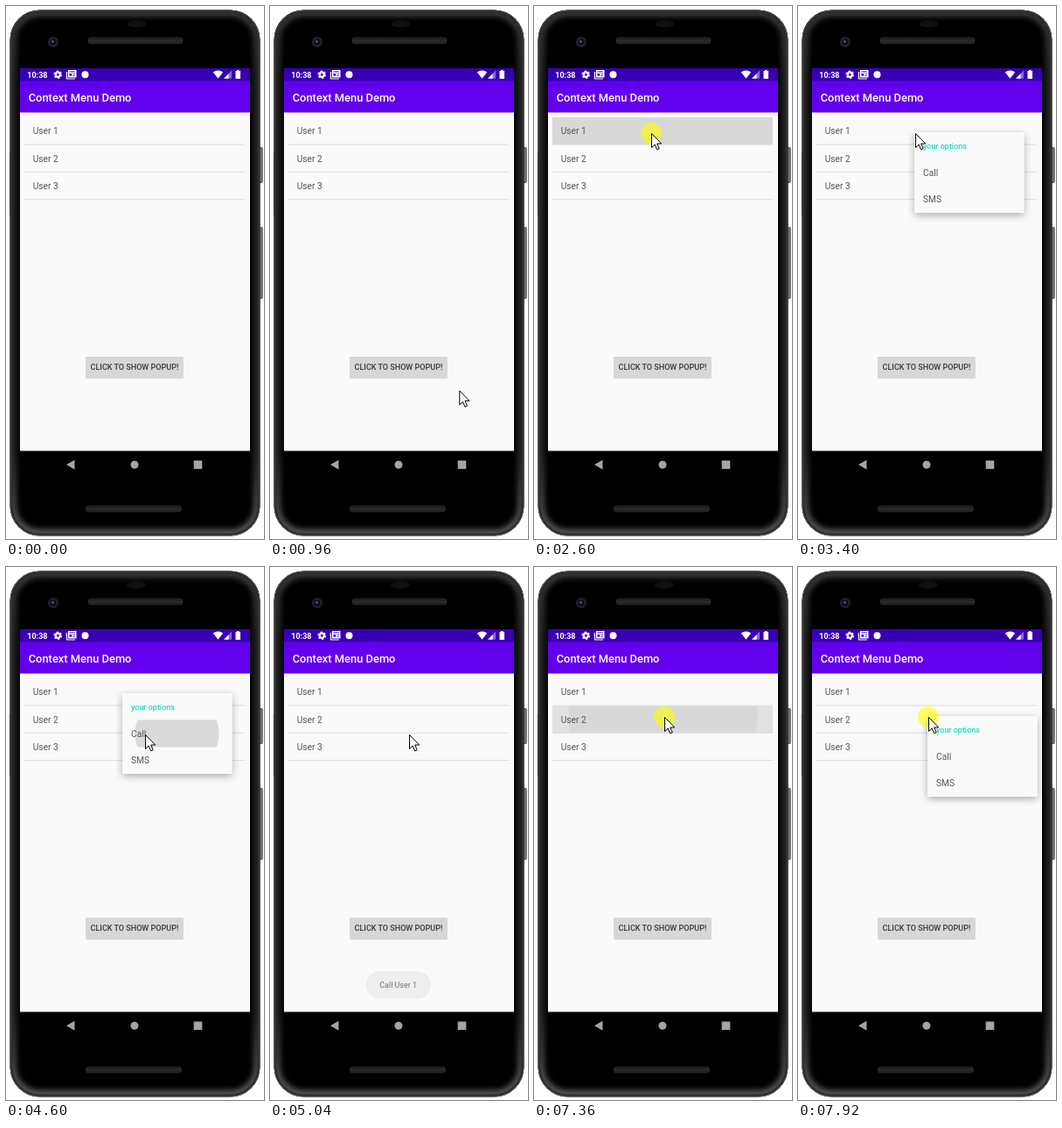
Recreate the animation shown at these times as an HTML page. Size 295 px wide and 608 px high, loop 8 s.

```html
<!DOCTYPE html>
<html lang="en">
<head>
<meta charset="utf-8">
<title>Context Menu Demo</title>
<style>
  html, body { margin: 0; width: 100%; height: 100%; overflow: hidden; background: #fff; }
  svg { display: block; width: 100%; height: 100%; }
  text { font-family: Roboto, sans-serif; font-size: 10.2px; fill: #545454; }
  .medium { font-size: 8.96px; font-weight: 500; }
</style>
</head>
<body>
<svg viewBox="0 0 295 608">
  <defs>
    <linearGradient id="glow" x2="0" y2="1">
      <stop offset="0" stop-color="#3c3c3c"/>
      <stop offset=".12" stop-color="#262626"/>
      <stop offset=".85" stop-color="#262626"/>
      <stop offset="1" stop-color="#5c5c5c"/>
    </linearGradient>
    <linearGradient id="bar" x2="0" y2="1">
      <stop offset="0" stop-color="#141414"/>
      <stop offset=".5" stop-color="#2c2c2c"/>
      <stop offset="1" stop-color="#1a1a1a"/>
    </linearGradient>
    <filter id="soft"><feGaussianBlur stdDeviation="3"/></filter>
    <filter id="shadow" x="-20%" y="-20%" width="140%" height="145%">
      <feDropShadow dx="0" dy="2.5" stdDeviation="4" flood-opacity=".32"/>
    </filter>
    <clipPath id="bodyClip"><rect x="4.500" y="4.500" width="286" height="600" rx="34"/></clipPath>
    <clipPath id="rowClip"><rect id="rowBox" x="21" width="252" height="31"/></clipPath>
    <clipPath id="callClip"><rect y="30.5" width="125" height="31"/></clipPath>
  </defs>

  <!-- phone -->
  <g fill="#7a7a7a" stroke="#383838" stroke-width=".8">
    <rect x="289" y="161.500" width="4.200" height="40" rx="1"/>
    <rect x="289" y="252.500" width="4.200" height="81" rx="1"/>
  </g>
  <path d="M4.500 167v72" stroke="#777" stroke-width="1"/>
  <g clip-path="url(#bodyClip)" fill="none">
    <rect x="4" y="4" width="287" height="601" fill="#000"/>
    <rect x="7.500" y="7.500" width="280" height="594" rx="31" stroke="url(#glow)" stroke-width="9" filter="url(#soft)"/>
    <rect x="5" y="5" width="285" height="599" rx="33.500" stroke="#5e5e5e"/>
    <rect x="6.500" y="6.500" width="282" height="596" rx="32" stroke="#2c2c2c" stroke-width="2"/>
  </g>
  <ellipse cx="149" cy="20.500" rx="11" ry="4" fill="#101014"/>
  <rect x="94" y="36" width="108" height="7" rx="3" fill="url(#bar)" stroke="#333" stroke-width=".6"/>
  <rect x="91.500" y="570" width="109" height="7" rx="3" fill="url(#bar)" stroke="#333" stroke-width=".6"/>
  <circle cx="54" cy="41" r="6" fill="#20222a"/>
  <circle cx="54" cy="41" r="3.600" fill="#0b0c18"/>
  <circle cx="53.500" cy="40.500" r="1.500" fill="#4b5488"/>

  <!-- screen -->
  <rect x="16" y="71" width="263" height="436.500" fill="#fafafa"/>
  <rect x="16" y="71" width="263" height="15" fill="#3700b3"/>
  <rect x="16" y="85.500" width="263" height="36" fill="#6200ee"/>
  <g fill="#fff">
    <text x="24.300" y="82" style="font-size:9px;font-weight:700;fill:#fff">10:38</text>
    <circle cx="59.300" cy="78.300" r="2.600" fill="none" stroke="#fff" stroke-width="2.200"/>
    <circle cx="59.300" cy="78.300" r="4.100" fill="none" stroke="#fff" stroke-width="1.400" stroke-dasharray="2.147"/>
    <path d="M69.500 75v8h9.500" fill="none" stroke="#fff" stroke-width="1.200"/>
    <path d="M71 73h9.500v8.500H71zM72.500 74.500v.9h6.500v-.9zm0 2.500v2.700h2.700V77zm4 0v.8H79V77zm0 1.900v.8H79v-.8z" fill-rule="evenodd"/>
    <circle cx="90.500" cy="78.300" r="4"/>
    <path d="M236.800 75.500Q242.500 71.300 248.200 75.500L242.500 82.800z"/>
    <path d="M258 73.500v9.300h-8.800z" opacity=".4"/>
    <path d="M254.600 77.200v5.600h-5.400z"/>
    <path d="M264 73h2.500v1h1.500v9h-5.500v-9H264z"/>
  </g>
  <text x="25.700" y="108.800" style="font-size:12.9px;font-weight:500;fill:#fff">Context Menu Demo</text>

  <g id="rowRipple" clip-path="url(#rowClip)" fill="#d8d8d8">
    <rect id="rowTint" x="21" y="120" width="252" height="110"/>
    <circle id="rowWave"/>
  </g>
  <g id="list"></g>

  <rect x="91" y="400.800" width="112" height="24.400" rx="1.500" fill="#000" opacity=".12"/>
  <rect x="91" y="400" width="112" height="24.500" rx="1.500" fill="#d6d7d7"/>
  <text class="medium" x="96.600" y="415.300" style="font-size:9.020px;fill:#383838">CLICK TO SHOW POPUP!</text>

  <g id="toast">
    <rect x="110" y="461" width="74" height="31.500" rx="15.700" fill="#eee"/>
    <text x="125.300" y="480" style="font-size:8.96px;fill:#747474">Call User 1</text>
  </g>

  <g fill="#a4a4a4">
    <path d="M78.500 517.800v11L69 523.300z"/>
    <circle cx="147" cy="523.300" r="4.500"/>
    <rect x="214.700" y="518.500" width="9.600" height="9.600"/>
  </g>

  <g id="popup">
    <rect width="125.500" height="92" rx="1" fill="#fafafa" filter="url(#shadow)"/>
    <circle id="callWave" cx="62.500" cy="46" fill="#dadada" clip-path="url(#callClip)"/>
    <text class="medium" x="10" y="18.500" style="fill:#1fd9c4">your options</text>
    <text x="10" y="49.800">Call</text>
    <text x="10" y="80.300">SMS</text>
  </g>

  <circle id="press" r="12" fill="#ff0"/>
  <path id="cursor" d="M.5.500V16.500L4.200 13 6.700 18.800 9.200 17.700 6.700 12H11.700z" fill="#fff" stroke="#000" stroke-width="1"/>
</svg>

<script>
const LOOP = 8000, TICK = 40;
const el = Object.fromEntries([...document.querySelectorAll('svg [id]')].map(e => [e.id, e]));
const set = (node, attrs) => { for (const k in attrs) node.setAttribute(k, attrs[k]); };
const show = (node, alpha) => set(node, { opacity: alpha, visibility: alpha > 0 ? 'visible' : 'hidden' });

el.list.innerHTML = [0, 1, 2].map(i => `
  <text x="30.700" y="${146 + i * 31.5}">User ${i + 1}</text>
  <rect x="21" y="${157.5 + i * 31.3}" width="252" height="1" fill="#dedede"/>`).join('');

const linear = u => u;
const easeOut = u => 1 - (1 - u) ** 2;
const easeInOut = u => u * u * (3 - 2 * u);

// Number of steps already taken out of n spread over from..to.
function stepsDone(t, from, to, n) {
  let done = 0;
  while (done < n && t >= Math.round((from + (to - from) * done / (n - 1 || 1)) / TICK) * TICK) done++;
  return done;
}

// Value of the last [time, value] pair that has been reached.
const at = (t, keys, start = 0) => keys.reduce((v, [time, next]) => t >= time ? next : v, start);

const moves = [
  { from: 560, to: 1320, n: 8, a: [251, 555], b: [170, 283], ease: linear },
  { from: 1440, to: 1640, n: 3, a: [170, 283], b: [145, 174], ease: linear },
  { from: 1720, to: 1960, n: 3, a: [145, 174], b: [134, 145], ease: easeOut },
  { from: 3600, to: 4160, n: 6, a: [134, 145], b: [163, 189], ease: easeInOut },
  { from: 4280, to: 4400, n: 2, a: [163, 189], b: [159, 191], ease: linear },
  { from: 6280, to: 6280, n: 1, a: [159, 191], b: [155, 182], ease: linear },
  { from: 6720, to: 6840, n: 2, a: [155, 182], b: [149, 171], ease: linear }
];

function cursorAt(t) {
  const m = moves.filter(move => t >= move.from).pop();
  if (!m) return null;
  const done = stepsDone(t, m.from, m.to, m.n);
  const u = m.ease(m === moves[0] ? (done - 1) / (m.n - 1) : done / m.n);
  return m.a.map((v, i) => v + (m.b[i] - v) * u);
}

function render(t) {
  const pos = cursorAt(t);
  const second = t >= 6000;
  show(el.cursor, pos ? 1 : 0);
  if (pos) set(el.cursor, { transform: `translate(${pos})` });

  const touch = second ? [149, 171] : [134, 145];
  set(el.press, { cx: touch[0], cy: touch[1] });
  show(el.press, t >= 2280 && t < 3400 || t >= 7160 ? .6 : 0);

  const grow = second ? stepsDone(t, 7160, 7480, 4) : stepsDone(t, 2280, 2600, 4);
  const fade = at(t, [[2960, .6], [3080, .25], [3200, 0], [6000, 1], [7800, .4], [7920, 0]], 1);
  set(el.rowBox, { y: second ? 158.5 : 127 });
  set(el.rowWave, {
    cx: touch[0] + (147 - touch[0]) * grow / 4,
    cy: touch[1],
    r: grow * 36
  });
  set(el.rowTint, { opacity: grow / 4 });
  show(el.rowRipple, grow ? fade : 0);

  const open = at(t, [[2960, .3], [3080, .75], [3200, 1], [4840, .45], [4920, 0], [7800, .5], [7920, 1]]);
  const scale = t < 4600 || second ? .8 + .2 * open : 1;
  set(el.popup, { transform: `translate(${second ? '148 170' : '133 144'}) scale(${scale})` });
  show(el.popup, open);
  set(el.callWave, { r: at(t, [[4600, 48], [4720, 80], [6000, 0]]) });

  show(el.toast, at(t, [[4920, .5], [5040, 1], [6920, .5], [7040, 0]]));
}

const start = performance.now();
function frame() {
  render((performance.now() - start) % LOOP);
  requestAnimationFrame(frame);
}
frame();
</script>
</body>
</html>
```
